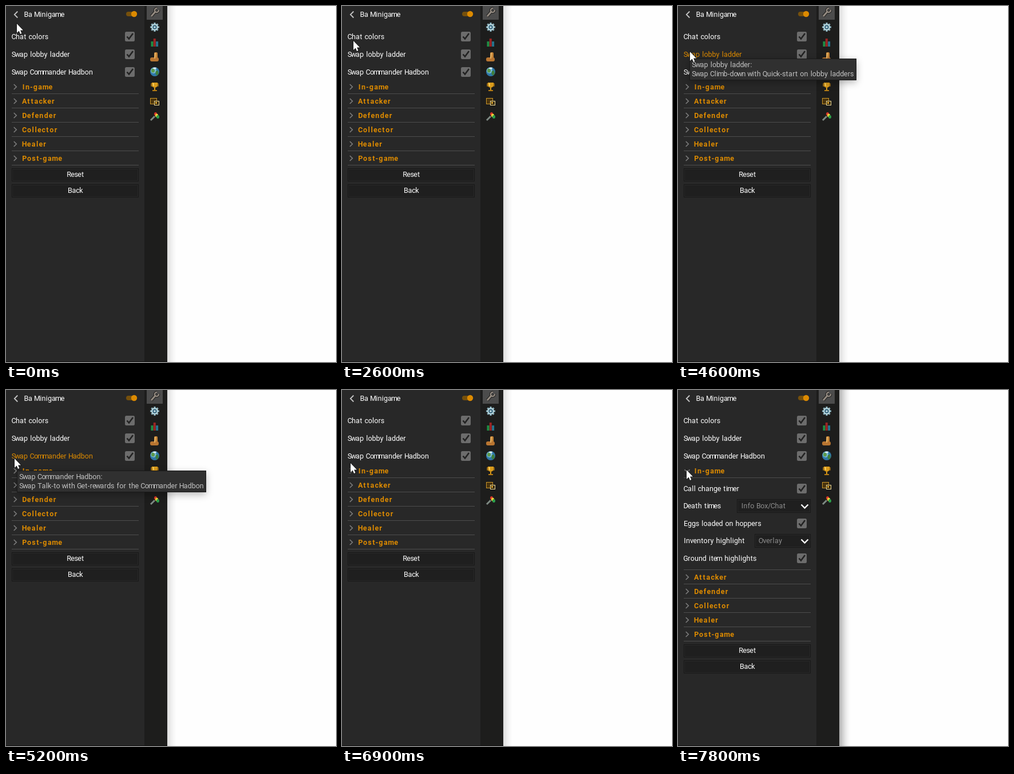
Animation of 577x623 px, one loop 8000 ms. Source, as an HTML page with a canvas:

```html
<!DOCTYPE html>
<html lang="en">
<head>
<meta charset="utf-8">
<title>Plugin settings</title>
<style>
html, body { margin: 0; width: 100%; height: 100%; overflow: hidden; background: #fefefe; }
canvas { display: block; width: 577px; height: 623px; }
</style>
</head>
<body>
<canvas id="stage" width="577" height="623"></canvas>
<script>
const stage = document.getElementById('stage');
const ctx = stage.getContext('2d');
const LOOP = 8000, STEP = 100;
const FOCUS_AT = 7700, EXPAND_AT = 7800;
const ORANGE = '#dc8a00', RULE = '#4d4d4d';
const LEFT = 10, RIGHT = 232, ROW = 25, OPTION_ROW = 31;
const REGULAR = '12.5px Roboto, "Liberation Sans", sans-serif';
const BOLD = 'bold ' + REGULAR;

const NAME = 'Commander Hadbon';
const OPTIONS = ['Chat colors', 'Swap lobby ladder', 'Swap ' + NAME];
const SECTIONS = ['Attacker', 'Defender', 'Collector', 'Healer', 'Post-game'];

const TIPS = [
  { from: 900, to: 2600, x: 20, y: 69,
    lines: [OPTIONS[0] + ':', 'Enable game chat colors on messages announced by this plugin'] },
  { from: 2700, to: 4800, x: 20, y: 92,
    lines: [OPTIONS[1] + ':', 'Swap Climb-down with Quick-start on lobby ladders'] },
  { from: 5200, to: 6900, x: 19, y: 141,
    lines: [OPTIONS[2] + ':', 'Swap Talk-to with Get-rewards for the ' + NAME] },
  { from: 7000, to: FOCUS_AT, x: 15, y: 154, lines: ['Expand'] }
];
const FIRST_HOVER = 400;

// The pointer rests between these eased glides
const HOME = { x: 18, y: 30 };
const GLIDES = [
  { from: 300, to: 500, x: 18, y: 41 },
  { from: 600, to: 700, x: 18, y: 47 },
  { from: 2500, to: 2900, x: 20, y: 77 },
  { from: 4500, to: 4600, x: 20, y: 79 },
  { from: 4700, to: 5300, x: 14, y: 120 },
  { from: 5400, to: 5500, x: 14, y: 121 },
  { from: 6800, to: 7300, x: 14, y: 139 }
];

const clamp01 = v => Math.min(1, Math.max(0, v));
const easeOut = p => 1 - (1 - p) ** 2;
const during = (t, span) => t >= span.from && t < span.to;

function pointerAt(t) {
  let { x, y } = HOME;
  for (const g of GLIDES) {
    const p = easeOut(clamp01((t - g.from) / (g.to - g.from)));
    x += (g.x - x) * p;
    y += (g.y - y) * p;
  }
  return [Math.round(x), Math.round(y)];
}

// Near-even letter pitch: narrow glyphs get air, wide ones are capped
const pitch = new Map();
function advance(c) {
  if (!pitch.has(c)) {
    ctx.font = REGULAR;
    const w = ctx.measureText(c).width;
    pitch.set(c, c === ' ' ? 4 : w < 5 ? w * 1.15 : w > 10 ? 9 : Math.min(7, Math.floor(w + 0.3)));
  }
  return pitch.get(c);
}
const textWidth = s => [...s].reduce((sum, c) => sum + advance(c), -1);

function text(s, x, y, color = '#ffffff', bold = false) {
  const extra = bold ? 1.4 : 0;
  for (const c of s) {
    const w = advance(c) + extra;
    ctx.font = bold ? BOLD : REGULAR;
    ctx.textAlign = 'center';
    ctx.fillStyle = color;
    ctx.fillText(c, x + w / 2, y);
    x += w;
  }
}

function rect(x, y, w, h, color, r = 0) {
  ctx.fillStyle = color;
  ctx.beginPath();
  ctx.roundRect(x, y, w, h, r);
  ctx.fill();
}

function frame(x, y, w, h, color) {
  ctx.strokeStyle = color;
  ctx.lineWidth = 1;
  ctx.strokeRect(x + 0.5, y + 0.5, w - 1, h - 1);
}

function oval(x, y, rx, ry, color) {
  ctx.fillStyle = color;
  ctx.beginPath();
  ctx.ellipse(x, y, rx, ry, 0, 0, Math.PI * 2);
  ctx.fill();
}
const disc = (x, y, r, color) => oval(x, y, r, r, color);

function line(x1, y1, x2, y2, color, width) {
  ctx.strokeStyle = color;
  ctx.lineWidth = width;
  ctx.beginPath();
  ctx.moveTo(x1, y1);
  ctx.lineTo(x2, y2);
  ctx.stroke();
}

function chevron(x, y, size, turn, color, width) {
  ctx.save();
  ctx.translate(x, y);
  ctx.rotate(turn * Math.PI / 2);
  ctx.strokeStyle = color;
  ctx.lineWidth = width;
  ctx.beginPath();
  ctx.moveTo(-size / 2, -size);
  ctx.lineTo(size / 2, 0);
  ctx.lineTo(-size / 2, size);
  ctx.stroke();
  ctx.restore();
}

function box(x, y, w, h) {
  rect(x, y, w, h, '#1f1f1f');
  frame(x, y, w, h, '#171717');
  frame(x + 1, y + 1, w - 2, h - 2, '#292929');
}

function option(label, y, hover) {
  text(label, LEFT, y + 4.5, hover ? ORANGE : '#ffffff');
  rect(208, y - 8.5, 17, 17, '#6c6c6c', 2.5);
  ctx.strokeStyle = '#222222';
  ctx.lineWidth = 2.6;
  ctx.beginPath();
  ctx.moveTo(211.5, y);
  ctx.lineTo(215, y + 4);
  ctx.lineTo(222, y - 5.5);
  ctx.stroke();
}

function choice(label, y, x, value) {
  text(label, LEFT, y + 4);
  box(x, y - 12, RIGHT - x, 24);
  text(value, x + 7.5, y + 4, '#8c8c8c');
  chevron(221.5, y + 0.5, 6, 1, '#ffffff', 2.4);
}

function section(label, y, open) {
  chevron(16, y, 4.5, open ? 1 : 0, '#7b7b7b', 1.7);
  text(label, 28, y + 4.5, ORANGE, true);
  rect(LEFT, y + 11.5, RIGHT - LEFT, 1, RULE);
}

function button(label, y) {
  box(LEFT, y, RIGHT - LEFT, 23);
  text(label, (LEFT + RIGHT - textWidth(label)) / 2, y + 15);
}

// Toolbar icons, each drawn around its own centre
function wrench() {
  for (const [color, grow] of [['#20201f', 2], ['#948b82', 0]]) {
    line(-6, 7, 1, -1, color, 3 + grow);
    ctx.lineWidth = 2.4 + grow;
    ctx.beginPath();
    ctx.arc(3.5, -3.5, 3.5, -0.2, 4.9);
    ctx.stroke();
  }
}

function gear() {
  for (let a = 0; a < Math.PI; a += Math.PI / 4) {
    const c = 8 * Math.cos(a), s = 8 * Math.sin(a);
    line(-c, -s, c, s, '#86aebb', 3);
  }
  ['#bcd9df', '#3b6b82', '#d5e8ec'].forEach((color, i) => disc(0, 0, 6 - 2.2 * i, color));
}

function bars() {
  ['#1f8f45', '#9a2424', '#24768f'].forEach((color, i) => {
    const h = i === 1 ? 14 : 9;
    rect(-6.5 + 4.3 * i, 8 - h, 4, h, color);
  });
}

function boot() {
  rect(-1, -8, 6, 13, '#c58538', 2);
  rect(-8, 1, 15, 7, '#b87531', 3);
  line(1, -7, 0, 3, '#efc171', 1.5);
}

function globe() {
  disc(0, 0, 8, '#2f78a8');
  disc(-2, -2, 5, '#79b9d8');
  oval(-3, -2, 3, 3.5, '#5c9a4b');
  oval(4, 2, 2.5, 4, '#3f803d');
  oval(0, -6, 3, 1.4, '#e0eef2');
}

function trophy() {
  ctx.strokeStyle = '#b87d13';
  ctx.lineWidth = 1.3;
  ctx.strokeRect(-6, -5, 12, 4);
  rect(-5, -7, 10, 9, '#d99b1b', [0, 0, 5, 5]);
  rect(-1, 2, 2, 5, '#d99b1b');
  rect(-4, 6, 8, 2, '#b87d13');
  line(-2.5, -6, -2, -1, '#ffe07a', 1.5);
}

function panes() {
  rect(-8, -6, 12, 11, '#4a340d');
  frame(-8, -6, 12, 11, '#c9952b');
  rect(-1, -1, 9, 8, '#35270c');
  frame(-1, -1, 9, 8, '#f2df9c');
  rect(1, 1, 3, 3, '#dca72f');
}

function brush() {
  line(-7, 7, 0, 0, '#7d8983', 3);
  ['#d8362a', '#f0d43a', '#2c9f4b'].forEach((color, i) => oval(1.5 + 2 * i, -4 + 2.5 * i, 2.5, 3, color));
}

const ICONS = [wrench, gear, bars, boot, globe, trophy, panes, brush];

function toolbar() {
  rect(242, 0, 40, stage.height, '#1d1d1c');
  rect(246, 0, 28, 24, '#4c4c4c');
  ICONS.forEach((icon, i) => {
    ctx.save();
    ctx.translate(260, 11 + 26 * i);
    icon();
    ctx.restore();
  });
}

function backdrop(focused) {
  rect(0, 0, stage.width, stage.height, '#fefefe');
  const reach = focused ? 20 : 17;
  const depth = focused ? 0.3 : 0.13;
  for (let i = 0; i < reach; i++) {
    rect(282 + i, 0, 1, stage.height, `rgba(0,0,0,${depth * (1 - i / reach) ** 1.6})`);
  }
}

function header() {
  chevron(17.5, 15, 5.5, 2, '#c4c4c4', 1.8);
  text('Ba Minigame', 32, 19);
  rect(210, 10, 18, 8, '#76500c', 4);
  disc(224, 14, 5.2, ORANGE);
}

function inGame() {
  option('Call change timer', 172.5);
  choice('Death times', 203, 103, 'Info Box/Chat');
  option('Eggs loaded on hoppers', 233.5);
  choice('Inventory highlight', 264, 134, 'Overlay');
  option('Ground item highlights', 294.5);
  rect(LEFT, 314, RIGHT - LEFT, 1, RULE);
}

function panel(t) {
  const open = t >= EXPAND_AT;
  const shift = open ? 161 : 0;
  backdrop(t >= FOCUS_AT);
  rect(0, 0, 242, stage.height, '#282828');
  toolbar();
  rect(0, 622, 282, 1, '#121212');
  header();
  OPTIONS.forEach((label, i) => {
    const { from, to } = TIPS[i];
    const hover = during(t, { from: i ? from : FIRST_HOVER, to });
    option(label, 53.5 + OPTION_ROW * i, hover);
  });
  section('In-game', 141.5, open);
  if (open) inGame();
  SECTIONS.forEach((label, i) => section(label, 166.5 + ROW * i + shift));
  button('Reset', 284 + shift);
  button('Back', 312 + shift);
}

function tooltip({ x, y, lines }) {
  const w = Math.round(Math.max(...lines.map(textWidth))) + 10;
  const h = 6 + 16 * lines.length;
  ctx.save();
  if (lines.length > 1) {
    ctx.shadowColor = 'rgba(0,0,0,0.28)';
    ctx.shadowBlur = 13;
    ctx.shadowOffsetY = 4;
  }
  rect(x, y, w, h, '#303030');
  ctx.restore();
  frame(x, y, w, h, '#191919');
  lines.forEach((s, i) => text(s, x + 4.5, y + 15 + 16 * i, '#c2c2c2'));
}

const ARROW = new Path2D('M0 0V16L3.7 12.6 6 18 8.4 17 6.1 11.6H11Z');
function pointer(x, y) {
  ctx.save();
  ctx.translate(x + 1, y + 1);
  ctx.strokeStyle = '#141414';
  ctx.lineWidth = 1.6;
  ctx.stroke(ARROW);
  ctx.fillStyle = '#ffffff';
  ctx.fill(ARROW);
  ctx.restore();
}

function draw(time) {
  const t = Math.floor(time / STEP) * STEP;
  panel(t);
  TIPS.filter(tip => during(t, tip)).forEach(tooltip);
  pointer(...pointerAt(t));
}

const start = performance.now();
function tick() {
  draw((performance.now() - start) % LOOP);
  requestAnimationFrame(tick);
}
tick();
</script>
</body>
</html>
```
